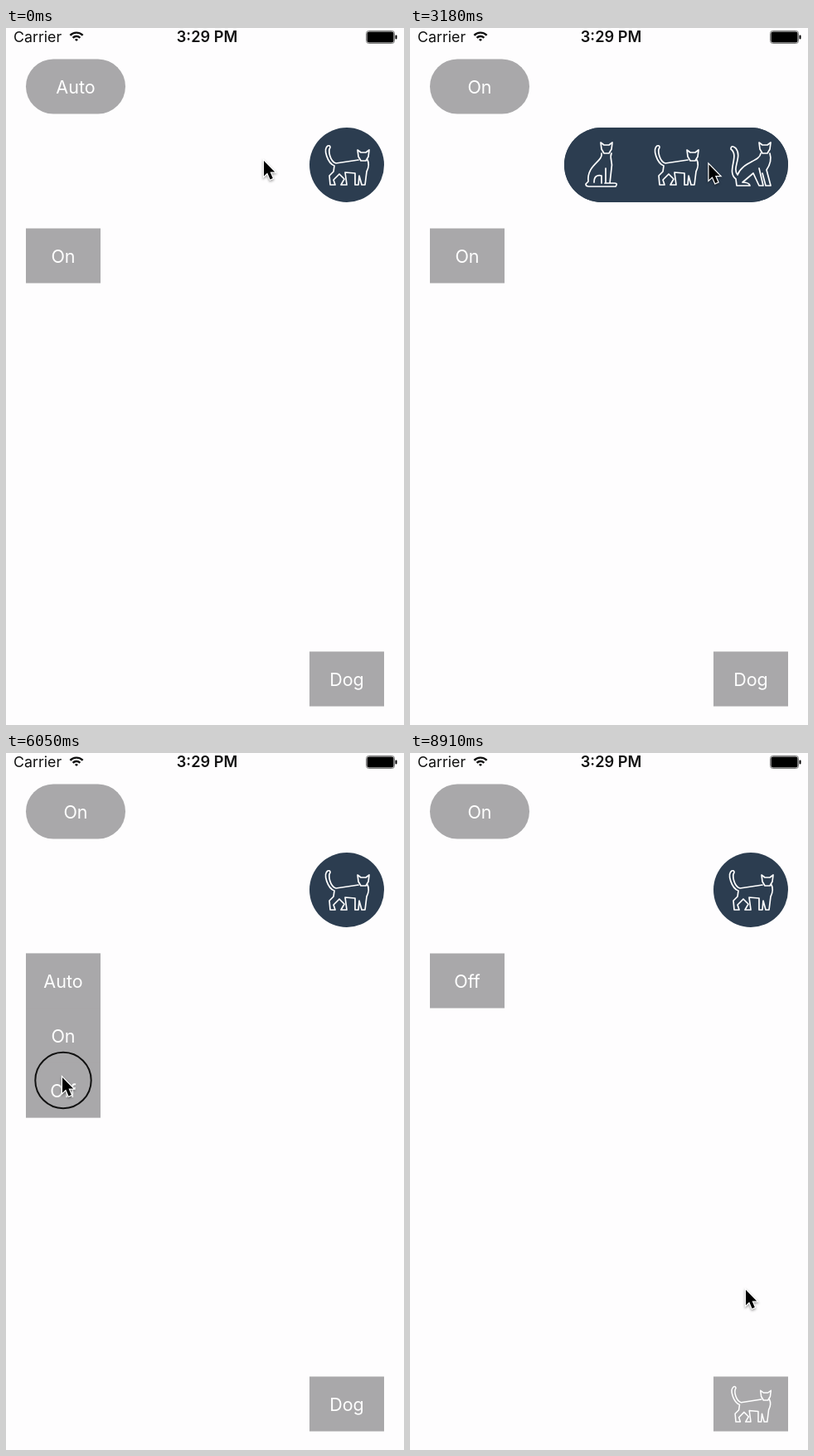
Write an HTML page with a canvas that moves like this. It is 480 px wide and 840 px high and loops after 9.22 s.

```html
<!DOCTYPE html>
<html lang="en">
<head>
<meta charset="utf-8">
<title>Expanding menus</title>
<style>
html, body { margin: 0; width: 100%; height: 100%; overflow: hidden; background: #fefdfe; }
canvas { display: block; }
</style>
</head>
<body>
<canvas id="stage" width="480" height="840"></canvas>
<script>
const ctx = document.getElementById('stage').getContext('2d');
const LOOP = 9220, SLIDE = 300, PRESS = 120;
const GRAY = '#a9a8aa', NAVY = '#2c3d50';
const FONT = 'Inter, Roboto, sans-serif';

// Every cat shares one head, placed at (x, y) from the icon's centre
const head = new Path2D('M-7 -7 L-3 -4 H3 L7 -7 L6 1 L3 6 H-3 L-6 1 Z');
function cat(x, y, body) {
  const path = new Path2D(body);
  path.addPath(head, new DOMMatrix([1, 0, 0, 1, x, y]));
  return path;
}
const walking = cat(20, -11,
  'M14 -6 L-13 -2 C-20 -4 -23 -17 -20 -21 Q-20 -24 -23 -23 C-29 -19 -23 -2 -15 1 ' +
  'L-16 8 L-21 13 L-20 24 H-14 L-16 18 L-9 11 L-3 17 L-7 24 H0 L-2 9 L10 10 V24 H14 L15 13 L18 24 H22 L24 8 Q28 0 25 -6');
const sitting = cat(6, -20,
  'M0 -14 C2 -4 -18 0 -16 20 L-19 23 Q-19 26 -15 26 H17 Q20 22 16 22 H4 M12 -14 C9 -8 14 -4 12 4 L10 22 M5 4 V22 M-9 21 Q-9 11 0 13 V22');
const scratching = cat(17, -20,
  'M12 -14 C11 -4 -10 -4 -16 12 C-23 4 -10 -10 -18 -20 Q-24 -25 -24 -19 C-13 -11 -30 8 -18 17 ' +
  'L-17 25 H-1 Q-2 21 -10 21 L3 10 L10 25 H15 L10 4 M23 -14 Q26 -4 19 6 L24 25 H18 L14 10');

// x, y is the closed box; (dx, dy) is the growth direction
const flags = ['Auto', 'On', 'Off'];
const menus = [
  { x: 24, y: 37.5, w: 120, h: 66, r: 33, dx: 1, dy: 0, open: 450, close: 1770, color: GRAY,
    rows: flags, before: 'Auto', after: 'On' },
  { x: 366, y: 120, w: 90, h: 90, r: 45, dx: -1, dy: 0, open: 2770, close: 4073, color: NAVY,
    rows: [sitting, walking, scratching], before: walking, after: walking },
  { x: 24, y: 241.5, w: 90, h: 66, r: 0, dx: 0, dy: 1, open: 5120, close: 6200, color: GRAY,
    rows: flags, before: 'On', after: 'Off' },
  { x: 366, y: 751.5, w: 90, h: 66, r: 0, dx: 0, dy: -1, open: 7494, close: 8605, color: GRAY, scale: 0.9,
    rows: ['Dog', walking, sitting, scratching], before: 'Dog', after: walking }
];
const releases = menus.flatMap(m => [m.open, m.close]);

// Pointer rests: arrive, leave, x, y
const rests = [
  [0, 50, 311, 160], [320, 450, 57, 64], [860, 900, 412, 160], [1270, 1270, 133, 68], [1450, 1770, 196, 74],
  [2590, 2770, 376, 163], [3880, 4090, 326, 168], [4640, 5120, 98, 243], [5860, 6200, 68, 391],
  [6450, 6450, 150, 178], [6950, 6950, 406, 699], [7300, 7494, 377, 754], [7640, 7640, 391, 753],
  [7910, 7950, 389, 733], [8270, LOOP, 405, 647]
];

const ease = k => { k = Math.min(1, Math.max(0, k)); return k * k * (3 - 2 * k); };

function text(str, x, y, size, align = 'center', weight = 400) {
  ctx.font = `${weight} ${size}px ${FONT}`;
  ctx.textAlign = align;
  ctx.fillText(str, x, y);
}

function item(content, cx, cy, scale = 1) {
  ctx.fillStyle = ctx.strokeStyle = '#fff';
  if (typeof content === 'string') return text(content, cx, cy + 8, 21.5);
  ctx.save();
  ctx.translate(cx, cy);
  ctx.scale(scale, scale);
  ctx.lineWidth = 1.7;
  ctx.lineJoin = ctx.lineCap = 'round';
  ctx.stroke(content);
  ctx.restore();
}

function drawMenu(m, t) {
  const { x, y, w, h, dx, dy, rows } = m;
  const k = ease((t - m.open) / SLIDE) - ease((t - m.close) / SLIDE);
  const grow = k * (rows.length - 1);
  const left = x + Math.min(0, dx) * grow * w, top = y + Math.min(0, dy) * grow * h;
  ctx.save();
  ctx.beginPath();
  ctx.roundRect(left, top, w * (1 + Math.abs(dx) * grow), h * (1 + Math.abs(dy) * grow), m.r);
  ctx.fillStyle = m.color;
  ctx.fill();
  ctx.clip();
  item(t < m.close ? m.before : m.after, x + w / 2, y + h / 2, m.scale);
  // A row covers the title once more than half of it fits
  if (k > 0) rows.forEach((row, i) => {
    if (i >= grow + 0.5) return;
    const rx = left + Math.abs(dx) * i * w, ry = top + Math.abs(dy) * i * h;
    ctx.fillStyle = m.color;
    ctx.fillRect(rx, ry, w, h);
    item(row, rx + w / 2, ry + h / 2, m.scale);
  });
  ctx.restore();
}

function box(x, y, w, h, r) {
  ctx.beginPath();
  ctx.roundRect(x, y, w, h, r);
}

function drawStatus() {
  ctx.fillStyle = ctx.strokeStyle = '#111';
  text('Carrier', 9, 17, 17.8, 'left');
  text('3:29 PM', 242.5, 17, 18.2, 'center', 600);
  ctx.lineWidth = 2.4;
  ctx.lineCap = 'butt';
  for (const r of [1.6, 6, 10.4]) {
    ctx.beginPath();
    ctx.arc(85, 16, r, -Math.PI * 0.76, -Math.PI * 0.24);
    ctx.stroke();
  }
  ctx.strokeStyle = '#777';
  ctx.lineWidth = 1;
  box(434.5, 3.5, 34, 15, 3);
  ctx.stroke();
  ctx.fillStyle = '#000';
  box(435.5, 4.5, 32, 13, 2);
  ctx.fill();
  box(469.5, 8.5, 2, 5, 1);
  ctx.fill();
}

const arrow = new Path2D('M0 0 V18.5 L4.2 14.6 L7.6 22.5 L10.8 21.1 L7.5 13.5 H13.2 Z');

function drawPointer(t) {
  const i = rests.findLastIndex(r => r[0] <= t);
  const [, leave, x, y] = rests[i];
  const [arrive, , nx, ny] = rests[i + 1] || rests[i];
  const k = t > leave ? ease((t - leave) / (arrive - leave)) : 0;
  ctx.save();
  ctx.translate(x + (nx - x) * k, y + (ny - y) * k);
  if (releases.some(end => t >= end - PRESS - 30 && t < end)) {
    ctx.strokeStyle = '#111';
    ctx.lineWidth = 2;
    ctx.beginPath();
    ctx.arc(1, 3.5, 33.7, 0, Math.PI * 2);
    ctx.stroke();
  }
  ctx.shadowColor = 'rgba(0,0,0,.4)';
  ctx.shadowBlur = 3;
  ctx.shadowOffsetY = 1.5;
  ctx.strokeStyle = '#fff';
  ctx.lineWidth = 2.4;
  ctx.stroke(arrow);
  ctx.shadowColor = 'transparent';
  ctx.fillStyle = '#000';
  ctx.fill(arrow);
  ctx.restore();
}

const start = performance.now();
function frame() {
  const t = (performance.now() - start) % LOOP;
  ctx.fillStyle = '#fefdfe';
  ctx.fillRect(0, 0, 480, 840);
  drawStatus();
  for (const m of menus) drawMenu(m, t);
  drawPointer(t);
  requestAnimationFrame(frame);
}
frame();
</script>
</body>
</html>
```
